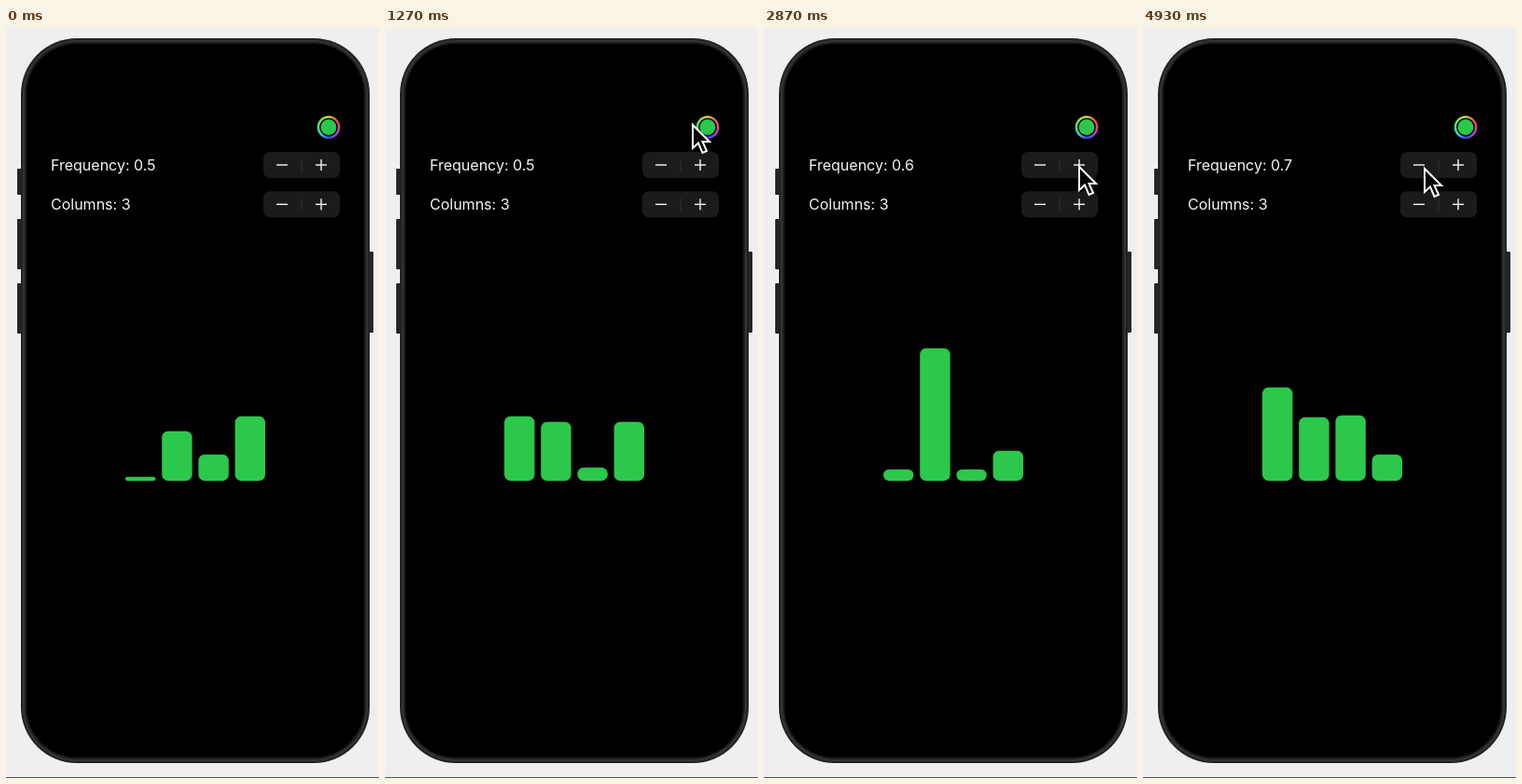
Animation of 400 by 805 pixels, one loop 4990 ms. Source, as an HTML page with a canvas:

```html
<!DOCTYPE html>
<html lang="en">
<head>
<meta charset="utf-8">
<title>Bar visualizer</title>
<style>
  html, body { margin: 0; width: 100%; height: 100%; overflow: hidden; background: #efeff0; }
  canvas { display: block; width: 400px; height: 805px; }
</style>
</head>
<body>
<canvas id="stage"></canvas>
<script>
const LOOP = 4990, STEP = 1000 / 15;
const W = 400, H = 805;
const PAPER = '#efeff0', INK = '#f6f6f4', GREEN = '#2bc84b';
const PANEL = '#1b1b1e', PRESSED = '#3b3b3c', BUTTON = '#252527';
const canvas = document.getElementById('stage');
const ctx = canvas.getContext('2d');
const dpr = window.devicePixelRatio || 1;
canvas.width = W * dpr;
canvas.height = H * dpr;
ctx.scale(dpr, dpr);

// key poses: time and bar heights
const POSES = [
  { at: 0, bars: [4, 53, 28, 69] },
  { at: 400, bars: [43, 33, 63, 139] },
  { at: 1267, bars: [69, 63, 14, 63] },
  { at: 1933, bars: [89, 10, 70, 58] },
  { at: 2867, bars: [12, 142, 12, 32] },
  { at: 3533, bars: [37, 89, 81, 79] },
  { at: 4933, bars: [100, 68, 70, 28] }
];

// the pointer rests at each stop and glides to the next just before `at`
const GLIDE = 400;
const STOPS = [
  { at: 200, x: 232, y: 382 },
  { at: 400, x: 255, y: 338 },
  { at: 800, x: 381, y: 205 },
  { at: 1200, x: 330, y: 104 },
  { at: 1800, x: 338, y: 149 },
  { at: 4733, x: 302, y: 151 }
];
const ARROW = new Path2D('M0 0V25L6 19.5L10.5 30L15 28L10.5 18H18Z');

const PRESS_ENDS = [2330, 3600], PRESS_TIME = 140;

const clamp = u => Math.min(1, Math.max(0, u));
const ease = u => u * u * (3 - 2 * u);
const mix = (a, b, u) => a + (b - a) * u;
const noise = n => { const v = Math.sin(n * 12.9898) * 43758.5453; return v - Math.floor(v); };

function box(x, y, w, h, r, color) {
  ctx.fillStyle = color;
  ctx.beginPath();
  ctx.roundRect(x, y, w, h, r);
  ctx.fill();
}

function line(x1, y1, x2, y2, color, width) {
  ctx.strokeStyle = color;
  ctx.lineWidth = width;
  ctx.beginPath();
  ctx.moveTo(x1, y1);
  ctx.lineTo(x2, y2);
  ctx.stroke();
}

function drawPhone() {
  ctx.fillStyle = PAPER;
  ctx.fillRect(0, 0, W, H);
  ctx.fillStyle = '#555';
  ctx.fillRect(0, 804, W, 1);
  box(12, 151, 6, 28, 1, BUTTON);
  for (const y of [205, 274]) box(12, y, 6, 54, 1, BUTTON);
  box(388, 240, 6, 87, 1, BUTTON);
  ['#222224', '#343436', '#1d1d1f', '#000'].forEach((color, i) => {
    const d = i * 2;
    box(16 + d, 11 + d, 374 - 2 * d, 778 - 2 * d, 60 - d, color);
  });
}

function drawPicker() {
  const x = 346, y = 106.5;
  const hues = ctx.createConicGradient(-Math.PI / 2, x, y);
  for (let i = 0; i <= 8; i++) hues.addColorStop(i / 8, `hsl(${415 - 45 * i} 78% 57%)`);
  ctx.strokeStyle = hues;
  ctx.lineWidth = 2.4;
  ctx.beginPath();
  ctx.arc(x, y, 11.1, 0, Math.PI * 2);
  ctx.stroke();
  ctx.fillStyle = GREEN;
  ctx.beginPath();
  ctx.arc(x, y, 8.4, 0, Math.PI * 2);
  ctx.fill();
}

function drawRow(label, y, pressed) {
  ctx.fillStyle = INK;
  ctx.font = '16px Inter, "Liberation Sans", sans-serif';
  ctx.fillText(label, 48, y + 6);
  box(276, y - 14, 82, 28, 7, PANEL);
  if (pressed) box(318, y - 13, 40, 26, 6, PRESSED);
  else line(317, y - 7, 317, y + 7, '#303033', 1);
  line(290, y, 302, y, INK, 1.4);
  line(332, y, 344, y, INK, 1.4);
  line(338, y - 6, 338, y + 6, INK, 1.4);
}

function drawBars(t) {
  const n = Math.max(1, POSES.findIndex(p => p.at >= t));
  const a = POSES[n - 1], b = POSES[n];
  const u = clamp((t - a.at) / (b.at - a.at));
  a.bars.forEach((from, i) => {
    const swing = (noise(n * 4 + i) - 0.5) * 30 * Math.sin(Math.PI * u);
    const h = Math.max(4, mix(from, b.bars[i], ease(u)) + swing);
    box(128 + i * 39.2, 485.8 - h, 32.4, h + 0.2, Math.min(6.5, h / 2), GREEN);
  });
}

function drawPointer(t) {
  if (t < STOPS[0].at) return;
  let { x, y } = STOPS[0];
  STOPS.forEach((stop, i) => {
    if (i === 0) return;
    const span = Math.min(GLIDE, stop.at - STOPS[i - 1].at);
    const u = ease(clamp((t - stop.at + span) / span));
    x = mix(x, stop.x, u);
    y = mix(y, stop.y, u);
  });
  ctx.save();
  ctx.translate(x, y);
  ctx.fillStyle = '#000';
  ctx.fill(ARROW);
  ctx.strokeStyle = '#fff';
  ctx.lineWidth = 2;
  ctx.stroke(ARROW);
  ctx.restore();
}

function draw(now) {
  const t = Math.floor(((now % LOOP) + 5) / STEP) * STEP + 0.5;
  const pressed = PRESS_ENDS.some(end => t >= end - PRESS_TIME && t < end);
  const clicks = PRESS_ENDS.filter(end => t >= end).length;
  drawPhone();
  drawPicker();
  drawRow('Frequency: 0.' + (5 + clicks), 147, pressed);
  drawRow('Columns: 3', 189.3, false);
  drawBars(Math.min(t, POSES[POSES.length - 1].at));
  drawPointer(t);
}

const start = performance.now();
function tick(now) {
  draw(Math.max(0, now - start));
  requestAnimationFrame(tick);
}
draw(0);
requestAnimationFrame(tick);
</script>
</body>
</html>
```
